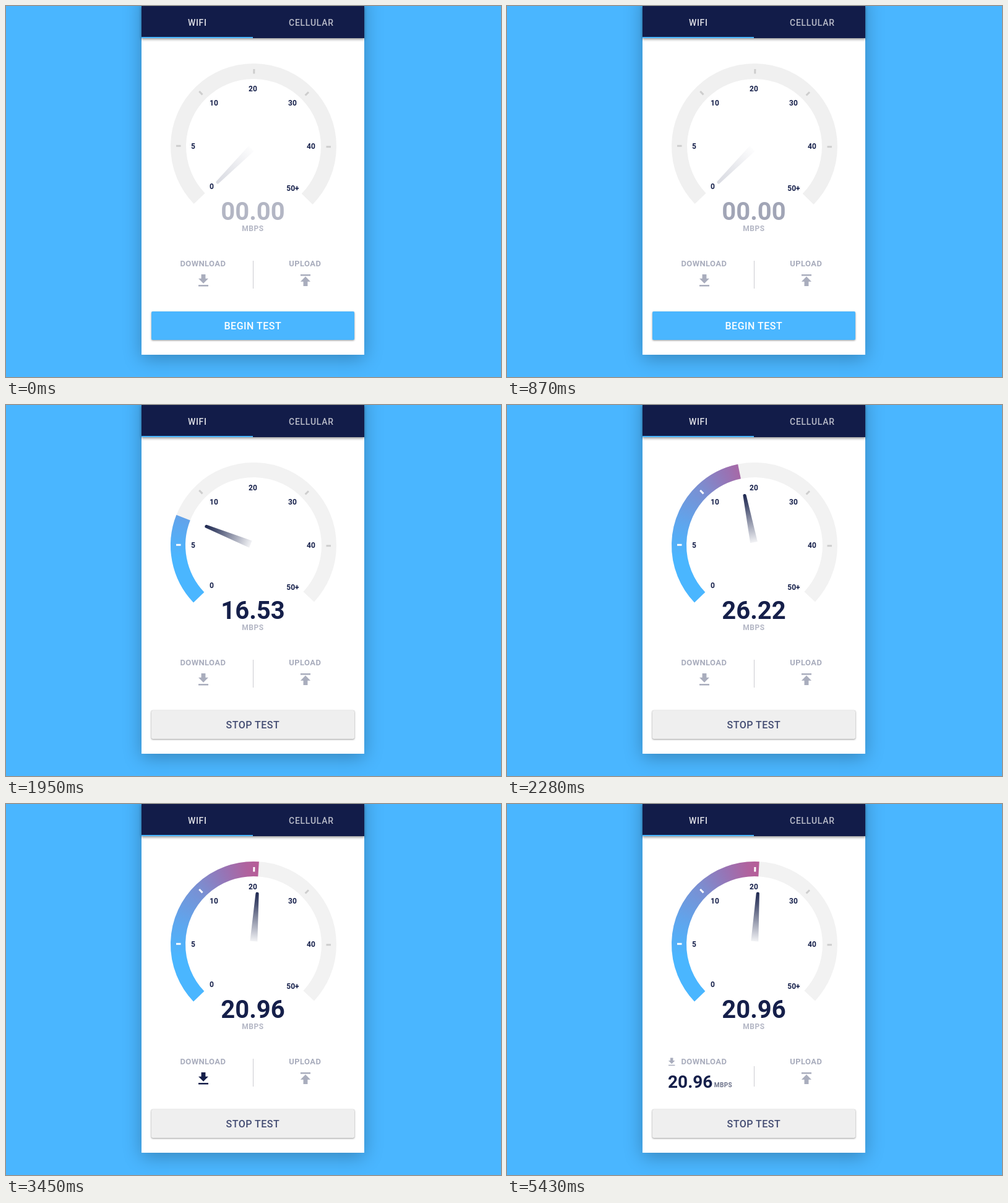
Animation of 800 by 600 pixels, one loop 5460 ms. Source, as an HTML page with a canvas:

```html
<!DOCTYPE html>
<html lang="en">
<head>
<meta charset="utf-8">
<title>Speed test</title>
<style>
  html, body { margin: 0; width: 100%; height: 100%; overflow: hidden; background: #4ab6ff; }
  #stage { position: absolute; left: 0; top: 0; width: 800px; height: 600px; overflow: hidden; }
  #stage > * { position: absolute; }
  #card { left: 219px; top: -20px; width: 360px; height: 584px; background: #fff; box-shadow: 0 6px 28px rgba(0, 0, 0, .27); }
  #bar { left: 219px; top: 0; width: 360px; height: 52px; background: #121c49; box-shadow: 0 2px 4px rgba(0, 0, 0, .42); }
  #tab { left: 219px; top: 50px; width: 180px; height: 2px; background: #4ab6ff; }
  .btn { left: 235px; top: 494px; width: 328px; height: 46px; border-radius: 2px; }
  #begin { background: #4ab6ff; box-shadow: 0 1px 3px rgba(0, 0, 0, .42); }
  #stop { background: #efefef; box-shadow: 0 0 1px rgba(0, 0, 0, .3), 0 1px 3px rgba(0, 0, 0, .38); }
  canvas, svg { left: 0; top: 0; }
  text { font-family: Roboto, Arial, sans-serif; font-weight: 700; fill: #151f4a; text-anchor: middle; }
  .tab { font-size: 14px; font-weight: 500; letter-spacing: .7px; fill: #fff; }
  .mark { font-size: 12px; }
  .unit { font-size: 12px; letter-spacing: .5px; fill: #b4b7c5; }
  .head { font-size: 13px; letter-spacing: .4px; fill: #a9adbd; }
  .label { font-size: 16px; font-weight: 500; letter-spacing: .5px; }
  .left { text-anchor: start; }
</style>
</head>
<body>
<div id="stage">
  <div id="card"></div>
  <div id="bar"></div>
  <div id="tab"></div>
  <div id="begin" class="btn"></div>
  <div id="stop" class="btn"></div>
  <canvas id="gauge" width="800" height="600"></canvas>
  <svg width="800" height="600">
    <text class="tab" x="309.3" y="32" opacity=".87">WIFI</text>
    <text class="tab" x="493.4" y="32" opacity=".7">CELLULAR</text>
    <g class="mark">
      <text x="332.5" y="296.3">0</text>
      <text x="302.5" y="231.2">5</text>
      <text x="336" y="161.2">10</text>
      <text x="399" y="138.2">20</text>
      <text x="463" y="161.2">30</text>
      <text x="493" y="231.2">40</text>
      <text x="463.5" y="299.3">50+</text>
    </g>
    <text id="speed" x="399" y="345.5" font-size="40">00.00</text>
    <text class="unit" x="399" y="364">MBPS</text>
    <text class="head" x="318.4" y="421">DOWNLOAD</text>
    <text class="head" x="483.3" y="421">UPLOAD</text>
    <path id="down" d="M19 9h-4V3H9v6H5l7 7 7-7zM5 18v2h14v-2z"/>
    <path d="M5 4v2h14V4zM5 14h4v6h6v-6h4l-7-7z" fill="#a9adbd" transform="translate(470.2 429.3) scale(1.15 1.18)"/>
    <rect id="rule" x="399" width="1" fill="#cbcbd0"/>
    <g id="result">
      <text class="left" x="260" y="459" font-size="28">20.96</text>
      <text class="left" x="334.8" y="458" font-size="10" letter-spacing=".4" style="fill:#6b7189">MBPS</text>
    </g>
    <text id="beginText" class="label" x="398.8" y="523" style="fill:#fff">BEGIN TEST</text>
    <text id="stopText" class="label" x="398.8" y="523" style="fill:#434c72">STOP TEST</text>
  </svg>
</div>
<script>
const LOOP = 5460, CX = 400, CY = 227;
const $ = id => document.getElementById(id);
const ctx = $('gauge').getContext('2d');
const rad = deg => (deg - 90) * Math.PI / 180;
const mix = (a, b, k) => a + (b - a) * k;
const ramp = (t, a, b) => Math.min(1, Math.max(0, (t - a) / (b - a)));
const ease = k => k * k * (3 - 2 * k);

// [time, dial angle], zero pointing straight up
const SWING = [[1620, -133.6], [1740, -123], [1860, -95], [1980, -60], [2100, -31], [2190, -18.5],
  [2280, -11.6], [2400, -8], [2550, -4.6], [2700, -1.9], [2880, .5], [3100, 2.6], [3450, 3.8], [3900, 3.3]];
const SPEED = [[1650, 0], [1800, 7.41], [1980, 18.35], [2130, 23.87], [2280, 26.22],
  [2430, 23.58], [2580, 21.34], [2700, 20.76], [2940, 20.76], [2970, 20.86], [3180, 20.86], [3210, 20.96]];

function track(steps, t) {
  let i = 1;
  while (i < steps.length - 1 && t > steps[i][0]) i++;
  const [a, b] = [steps[i - 1], steps[i]];
  return mix(a[1], b[1], ramp(t, a[0], b[0]));
}

const heat = ctx.createConicGradient(rad(-140), CX, CY);
[[-140, '#4ab6ff'], [-100, '#4ab6ff'], [-75, '#5da7ef'], [-45, '#7990d3'],
 [-22, '#9774b5'], [-5, '#b0629e'], [8, '#bb5b94'], [200, '#bb5b94']]
  .forEach(([deg, color]) => heat.addColorStop((deg + 140) / 360, color));

const fade = ctx.createLinearGradient(0, -84, 0, -5);
fade.addColorStop(0, 'rgba(24,34,76,.97)');
fade.addColorStop(.25, 'rgba(24,34,76,.78)');
fade.addColorStop(1, 'rgba(24,34,76,.06)');

function ring(from, to, r, width, style) {
  ctx.beginPath();
  ctx.arc(CX, CY, r, rad(from), rad(to));
  ctx.lineWidth = width;
  ctx.strokeStyle = style;
  ctx.stroke();
}

function tick(deg, color, alpha) {
  ctx.save();
  ctx.translate(CX, CY);
  ctx.rotate(deg * Math.PI / 180);
  ctx.globalAlpha = alpha;
  ctx.fillStyle = color;
  ctx.fillRect(-1.5, -125, 3, 7.5);
  ctx.restore();
}

function needle(deg, alpha) {
  ctx.save();
  ctx.translate(CX, CY);
  ctx.rotate(deg * Math.PI / 180);
  ctx.globalAlpha = alpha;
  ctx.fillStyle = fade;
  ctx.beginPath();
  ctx.moveTo(-6, -5);
  ctx.lineTo(-2.6, -82);
  ctx.arc(0, -82, 2.6, Math.PI, 0);
  ctx.lineTo(6, -5);
  ctx.fill();
  ctx.restore();
}

function drawGauge(t, run) {
  const end = track(SWING, t);
  const moving = t > 1620;
  const gray = Math.round(mix(240, 242, run));
  ctx.clearRect(0, 0, 800, 600);
  ring(mix(-134, -133.4, run), mix(134.5, 133, run), mix(121.5, 122, run), mix(25, 24, run), `rgb(${gray},${gray},${gray})`);
  if (moving) ring(-133.6, end, 122, 24, heat);
  for (const deg of [-90, -45, 0, 45, 90]) {
    const lit = moving && end > deg + 1;
    tick(deg + .4, lit ? '#fff' : '#cdcdcd', lit || deg ? 1 : 1 - run);
  }
  needle(mix(-135, end + .4, run), mix(.17, 1, run));
}

function drawIcon(t, shift) {
  const pulse = t > 2280 ? (1 - Math.cos((t - 2280) / 760 * 2 * Math.PI)) / 2 : 0;
  const on = Math.min(1, pulse * 1.3) * (1 - shift);
  const c = [[169, 21], [173, 31], [189, 74]].map(([a, b]) => Math.round(mix(a, b, on)));
  $('down').setAttribute('fill', `rgb(${c})`);
  $('down').setAttribute('transform',
    `translate(${mix(305.3, 257.2, shift)} ${mix(430.6, 408.2, shift)}) scale(${mix(1.14, .75, shift)})`);
}

function render(t) {
  const run = ease(ramp(t, 1575, 1710));
  const shift = ease(ramp(t, 3480, 3840));
  drawGauge(t, run);
  drawIcon(t, shift);

  const idle = .32 + .04 * (1 - Math.cos(t / 780 * Math.PI));
  const value = track(SPEED, Math.floor(t / 30) * 30);
  $('speed').textContent = value.toFixed(2).padStart(5, '0');
  $('speed').style.opacity = mix(idle, 1, run);

  $('begin').style.opacity = $('beginText').style.opacity = 1 - run;
  $('stop').style.opacity = $('stopText').style.opacity = run;

  const top = mix(412, 424, shift);
  $('rule').setAttribute('y', top);
  $('rule').setAttribute('height', 457 - top);
  $('result').style.opacity = ease(ramp(t, 3660, 3960));
}

const start = performance.now();
function loop() {
  render((performance.now() - start) % LOOP);
  requestAnimationFrame(loop);
}
loop();
</script>
</body>
</html>
```
